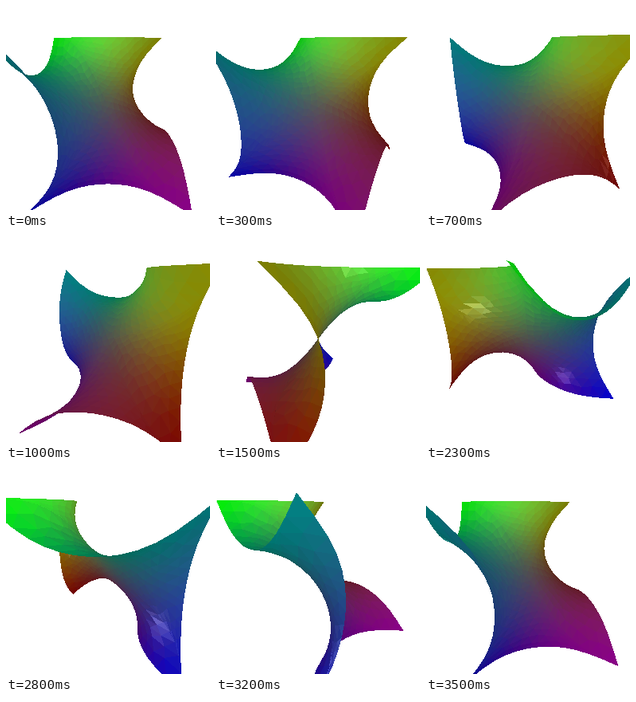
An HTML page with a canvas for the animation above (3600 ms loop, 256 px wide and 256 px high).

```html
<!DOCTYPE html>
<html>
<head>
<meta charset="utf-8">
<style>
html, body { margin: 0; width: 100%; height: 100%; overflow: hidden; background: #fff; }
canvas { display: block; }
</style>
</head>
<body>
<canvas id="stage" width="256" height="256"></canvas>
<script>
const { sin, cos, atan2, hypot, exp, floor, ceil, max, min, abs, PI } = Math;
const SIZE = 256, ROWS = 14;
const FOCAL = 221.7, DIST = 2.68, PITCH = 20.2 * PI / 180, MID_Y = 127;
// Light direction and glow centre, both fixed to the surface
const LIGHT = [-0.316, -0.285, -0.9], GLOW = [-0.3, 1, -0.8];
const ctx = document.getElementById('stage').getContext('2d');
const image = ctx.createImageData(SIZE, SIZE);
const pixels = new Uint32Array(image.data.buffer);
const nearest = new Float32Array(SIZE * SIZE);

let seed = 7;
const random = () => (seed = seed * 16807 % 2147483647) / 2147483647 - 0.5;
const dot = (a, b) => a[0] * b[0] + a[1] * b[1] + a[2] * b[2];
const sub = (a, b) => a.map((c, k) => c - b[k]);
const unit = v => { const l = hypot(...v) || 1; return v.map(c => c / l); };

// Gyroid level function and its slope along (1, 1, 1)
const gyroid = (x, y, z) => sin(x) * cos(y) + sin(y) * cos(z) + sin(z) * cos(x);
const slope = (x, y, z) => cos(x) * cos(y) + cos(y) * cos(z) + cos(z) * cos(x)
  - sin(x) * sin(y) - sin(y) * sin(z) - sin(z) * sin(x);

// Point of one sector: u runs along the rim arc, r from the centre to the rim
function surfacePoint(u, r) {
  const x = (u - 0.5) * PI;
  const rim = [x, PI / 2, -atan2(1, cos(x))];
  const mean = (rim[0] + rim[1] + rim[2]) / 3;
  const flat = rim.map(c => (c - mean) * r);
  let h = mean * r;
  for (let k = 0; k < 8; k++) {
    const p = flat.map(c => c + h);
    h -= gyroid(...p) / slope(...p);
  }
  return flat.map(c => (c + h) * 2 / PI);
}

function tint(p) {
  const [r, g, b] = p.map(v => min(1, max(0, (v + 1) / 2)));
  const d = sub(p, GLOW);
  const glow = 1 + 0.45 * exp(-dot(d, d) / 0.9);
  const redness = max(0, r - max(g, b));
  const k = 0.79 / (r + g + b) ** 0.6 * glow * (1 - 0.36 * redness);
  return [r * k, g * k, b * k];
}

function buildMesh() {
  const faces = [];
  for (let s = 0; s < 6; s++) {
    const turn = s % 3, sign = s < 3 ? 1 : -1;
    const rows = [];
    for (let i = 0; i <= ROWS; i++) {
      rows.push([]);
      for (let j = 0; j <= i; j++) {
        const inner = i < ROWS && j > 0 && j < i;
        const a = inner ? random() * 0.4 : 0, b = inner ? random() * 0.4 : 0;
        const p = surfacePoint(i ? (j + a) / i : 0, (i + b) / ROWS);
        rows[i].push([0, 1, 2].map(k => sign * p[(k + turn) % 3]));
      }
    }
    const add = (...v) => faces.push({
      v, color: tint([0, 1, 2].map(k => (v[0][k] + v[1][k] + v[2][k]) / 3))
    });
    for (let i = 0; i < ROWS; i++) {
      for (let j = 0; j <= i; j++) {
        add(rows[i][j], rows[i + 1][j], rows[i + 1][j + 1]);
        if (j < i) add(rows[i][j], rows[i + 1][j + 1], rows[i][j + 1]);
      }
    }
  }
  return faces;
}

const faces = buildMesh();
const sp = sin(PITCH), cp = cos(PITCH);
const eye = [0, DIST * sp, DIST * cp];

function project([x, y, z]) {
  const scale = FOCAL / (DIST - y * sp - z * cp);
  return [SIZE / 2 + x * scale, MID_Y - (y * cp - z * sp) * scale, scale];
}

function shade(v, color, light) {
  const e = sub(v[1], v[0]), g = sub(v[2], v[0]);
  let n = unit([e[1] * g[2] - e[2] * g[1], e[2] * g[0] - e[0] * g[2], e[0] * g[1] - e[1] * g[0]]);
  const view = unit(sub(eye, v[0]));
  if (dot(n, view) < 0) n = n.map(c => -c);
  const half = unit(view.map((c, k) => c + light[k]));
  const diffuse = 0.78 + 0.27 * dot(n, view);
  const shine = dot(n, light) > 0 ? 0.22 * max(0, dot(n, half)) ** 110 : 0;
  const [r, gr, b] = color.map(c => min(255, 255 * (c * diffuse + shine)) | 0);
  return (255 << 24 | b << 16 | gr << 8 | r) >>> 0;
}

// Depth-buffered triangle; 1 / depth is linear on screen
function fill([a, b, c], rgba) {
  const area = (b[0] - a[0]) * (c[1] - a[1]) - (b[1] - a[1]) * (c[0] - a[0]);
  if (abs(area) < 1e-9) return;
  const x0 = max(0, ceil(min(a[0], b[0], c[0]) - 0.5));
  const x1 = min(SIZE - 1, floor(max(a[0], b[0], c[0]) - 0.5));
  const y0 = max(0, ceil(min(a[1], b[1], c[1]) - 0.5));
  const y1 = min(SIZE - 1, floor(max(a[1], b[1], c[1]) - 0.5));
  for (let y = y0; y <= y1; y++) {
    for (let x = x0; x <= x1; x++) {
      const px = x + 0.5 - a[0], py = y + 0.5 - a[1];
      const wb = (px * (c[1] - a[1]) - py * (c[0] - a[0])) / area;
      const wc = (py * (b[0] - a[0]) - px * (b[1] - a[1])) / area;
      if (wb < -1e-6 || wc < -1e-6 || wb + wc > 1.000001) continue;
      const near = a[2] + wb * (b[2] - a[2]) + wc * (c[2] - a[2]);
      const at = y * SIZE + x;
      if (near > nearest[at]) {
        nearest[at] = near;
        pixels[at] = rgba;
      }
    }
  }
}

let shown = -1;
function draw(now) {
  const step = floor(now % 3600 / 100);
  if (step !== shown) {
    shown = step;
    const s = sin(step * PI / 18), c = cos(step * PI / 18);
    const turn = ([x, y, z]) => [x * c - z * s, y, x * s + z * c];
    const light = turn(LIGHT);
    pixels.fill(0xffffffff);
    nearest.fill(0);
    for (const { v, color } of faces) {
      const turned = v.map(turn);
      fill(turned.map(project), shade(turned, color, light));
    }
    ctx.putImageData(image, 0, 0);
  }
}

const start = performance.now();
function loop() {
  draw(performance.now() - start);
  requestAnimationFrame(loop);
}
loop();
</script>
</body>
</html>
```
